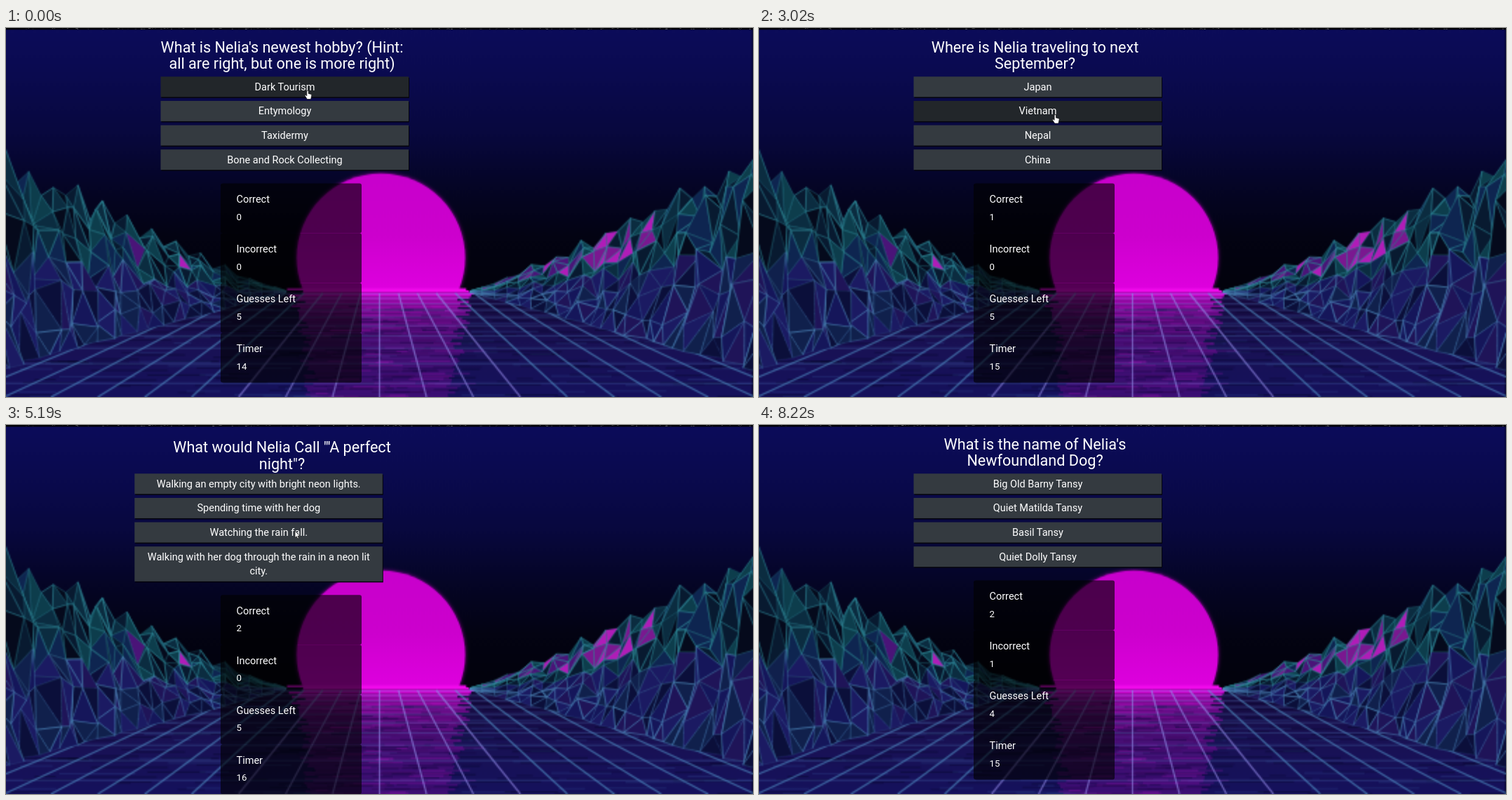
These frames come from a looping animation (1065 px wide and 526 px high, 8500 ms). An HTML page with a canvas:

```html
<!DOCTYPE html>
<html lang="en">
<head>
<meta charset="utf-8">
<title>Trivia quiz</title>
<style>
  html, body { margin: 0; width: 100%; height: 100%; overflow: hidden; background: #04041c; }
  canvas, svg { position: absolute; left: 0; top: 0; width: 1065px; height: 526px; display: block; }
  text { font-family: Roboto, "Liberation Sans", sans-serif; fill: #fff; }
  .title { font-size: 21.6px; text-anchor: middle; }
  .option { font-size: 14.5px; text-anchor: middle; }
  .label { font-size: 14.5px; }
  .value { font-size: 13.2px; }
</style>
</head>
<body>
<canvas id="scene" width="533" height="263"></canvas>
<svg id="ui" viewBox="0 0 1065 526"></svg>
<script>
const W = 1065, H = 526, HORIZON = 375, SUN_X = 535;
const LOOP = 8500, STEP = LOOP / 62;
const lerp = (a, b, k) => a + (b - a) * k;
const clamp = k => Math.min(1, Math.max(0, k));
const times = (n, make) => Array.from({ length: n }, (_, i) => make(i));

let seed = 77;
const rnd = () => (seed = (seed * 16807) % 2147483647) / 2147483647;
const spread = size => (rnd() - .5) * size;
const pick = list => list[Math.floor(rnd() * list.length)];

// ---------- Scenery, drawn once at half size for a soft look ----------
const ctx = document.getElementById('scene').getContext('2d');
ctx.scale(.5, .5);

// Evenly spaced colours from y0 down to y1
function vertical(y0, y1, ...colors) {
  const g = ctx.createLinearGradient(0, y0, 0, y1);
  colors.forEach((color, i) => g.addColorStop(i / (colors.length - 1), color));
  return g;
}

function box(x, y, w, h, fill) {
  ctx.fillStyle = fill;
  ctx.fillRect(x, y, w, h);
}

function line(x0, y0, x1, y1, color, width) {
  ctx.strokeStyle = color;
  ctx.lineWidth = width;
  ctx.beginPath();
  ctx.moveTo(x0, y0);
  ctx.lineTo(x1, y1);
  ctx.stroke();
}

function drawSky() {
  box(0, 0, W, H, vertical(0, HORIZON, '#0c0c5a', '#0a0a4e', '#08083e', '#050526', '#030312', '#02020c'));
}

function drawSun() {
  ctx.shadowColor = '#a000a8';
  ctx.shadowBlur = 3;
  ctx.beginPath();
  ctx.arc(SUN_X, 327.5, 120, 0, 7);
  ctx.fillStyle = vertical(206, 380, '#c800cc', '#cc00cd', '#e000e0');
  ctx.fill();
  ctx.shadowBlur = 0;
}

function drawGround() {
  box(0, HORIZON, W, H - HORIZON, vertical(HORIZON, H, '#160a3c', '#191154', '#15115c'));
  times(260, () => box(rnd() * W, lerp(HORIZON, H, rnd()), 20 + rnd() * 90, 2,
    pick(['rgba(4,6,36,.4)', 'rgba(4,6,36,.3)', 'rgba(50,80,150,.3)'])));
  // Ragged rows mirror the sun
  for (let y = HORIZON - 4; y < H; y += 3) {
    const v = (y - HORIZON) / (H - HORIZON);
    const left = 122 - 25 * v + spread(24), right = 122 - 25 * v + spread(24);
    const glow = Math.exp(-5 * Math.max(0, v));
    box(SUN_X - left, y, left + right, 3, `rgba(${140 + 100 * glow},10,${165 + 70 * glow},${.32 + .68 * glow})`);
  }
  times(110, () => box(415 + rnd() * 200, lerp(395, H, rnd()), 15 + rnd() * 60, 2,
    pick(['rgba(20,8,70,.45)', 'rgba(190,20,200,.25)'])));
  // Perspective grid
  for (let k = -13; k <= 13; k++) {
    line(533 + 27 * k, HORIZON + 3, 533 + 67 * k, H, Math.abs(k) < 4 ? 'rgba(150,140,235,.6)' : 'rgba(90,165,215,.55)', 2.4);
  }
  for (let depth = 1; depth > .4; depth -= .062) {
    const y = 278 + 101 / depth;
    line(0, y, W, y, 'rgba(90,140,205,.35)', 1.6);
  }
}

const teals = ['#0b2c40', '#0d3d4c', '#081a30', '#050a1c', '#0e2550'];
const indigos = ['#15165a', '#1b1a62', '#0b0f3a', '#1f1458', '#10204c'];
const magentas = ['#7a1890', '#b01cb8', '#4a1478'];

// Jagged range that rises from its foot at the horizon to the edge of the stage
function drawMountains(foot, edge, magentaOdds) {
  const cols = 24, rows = 6;
  const mesh = times(cols + 1, i => {
    const u = i / cols;
    const ridge = HORIZON - 190 * u ** 1.15 + (i % 2 ? -1 : 1) * rnd() * 34 * u;
    const base = HORIZON + 2 + 112 * u;
    return times(rows + 1, j => [
      lerp(foot, edge, u) + spread(34) * u * (j > 0),
      lerp(ridge, base, (j / rows) ** 1.2) + spread(44) * u * (j > 0 && j < rows)
    ]);
  });

  function facet(points, u, v) {
    const high = v < .5;
    ctx.beginPath();
    points.forEach(p => ctx.lineTo(...p));
    ctx.closePath();
    ctx.fillStyle = u < .62 && v < .3 && rnd() < magentaOdds ? pick(magentas) : pick(high ? teals : indigos);
    ctx.fill();
    ctx.strokeStyle = high ? `rgba(52,150,165,${.2 + rnd() * .5})` : `rgba(85,150,200,${.1 + rnd() * .5})`;
    ctx.lineWidth = 1 + rnd() * 1.2;
    ctx.stroke();
  }

  ctx.lineJoin = 'round';
  for (let i = 0; i < cols; i++) {
    for (let j = 0; j < rows; j++) {
      const a = mesh[i][j], b = mesh[i + 1][j], c = mesh[i][j + 1], d = mesh[i + 1][j + 1];
      facet([a, b, c], i / cols, j / rows);
      facet([b, d, c], i / cols, j / rows);
    }
  }
}

drawSky();
drawSun();
drawGround();
drawMountains(400, -20, .04);
drawMountains(662, W + 20, .5);

// ---------- Quiz ----------
const scenes = [
  { at: -2070, score: [0, 0, 5], title: ["What is Nelia's newest hobby? (Hint:", 'all are right, but one is more right)'],
    options: [['Dark Tourism'], ['Entymology'], ['Taxidermy'], ['Bone and Rock Collecting']] },
  { at: 1366, score: [1, 0, 5], title: ['Where is Nelia traveling to next', 'September?'],
    options: [['Japan'], ['Vietnam'], ['Nepal'], ['China']] },
  { at: 4550, score: [2, 0, 5], title: ['What would Nelia Call "\'A perfect', 'night"?'],
    options: [['Walking an empty city with bright neon lights.'], ['Spending time with her dog'], ['Watching the rain fall.'],
      ['Walking with her dog through the rain in a neon lit', 'city.']] },
  { at: 7110, score: [2, 1, 4], title: ["What is the name of Nelia's", 'Newfoundland Dog?'],
    options: [['Big Old Barny Tansy'], ['Quiet Matilda Tansy'], ['Basil Tansy'], ['Quiet Dolly Tansy']] }
];

const pointerStart = { x: 430, y: 89 };
const pointerMoves = [
  { from: 0, until: 680, x: 414.5, y: 152 },
  { from: 2340, until: 3800, x: 432, y: 88 },
  { from: 4120, until: 4520, x: 412, y: 151 },
  { from: 5770, until: 6580, x: 417, y: 121 },
  { from: 7130, until: 8200, x: 965, y: 550 }
];

function pointerAt(t) {
  return pointerMoves.reduce((pos, move) => {
    const k = clamp((t - move.from) / (move.until - move.from)), s = k * k * (3 - 2 * k);
    return { x: lerp(pos.x, move.x, s), y: lerp(pos.y, move.y, s) };
  }, pointerStart);
}

// The CSS "ease" curve, solved by bisection
function ease(x) {
  if (x <= 0 || x >= 1) return clamp(x);
  let lo = 0, hi = 1;
  for (let i = 0; i < 24; i++) {
    const s = (lo + hi) / 2;
    if (.75 * s * (1 - s) + s ** 3 < x) lo = s; else hi = s;
  }
  return .3 * lo * (1 - lo) ** 2 + 3 * lo * lo * (1 - lo) + lo ** 3;
}

const text = (cls, x, y, str) => `<text class="${cls}" x="${x}" y="${y}">${str}</text>`;
const rect = (x, y, w, h, fill, more = '') => `<rect x="${x}" y="${y}" width="${w}" height="${h}" fill="${fill}" ${more}/>`;

const strip = rect(0, 0, W, 2.5, '#020208')
  + times(150, () => rect(rnd() * W, Math.floor(rnd() * 2), 1 + rnd() * 2, 1, '#777', `opacity="${rnd() * .7}"`)).join('');

const hand = 'M-1.2 .8Q0-.8 1.2 .8V4.4L5 5.4Q6 5.8 5.8 7L4.6 12.5H-.6L-3.8 7.6Q-3.6 6-2.2 6.8L-1.2 7.8Z';
const arrow = 'M0 0V9.6L2.2 7.7L3.8 11L5.4 10.3L3.9 7.2H6.8Z';

function draw(t) {
  const scene = scenes.filter(s => s.at <= t).pop();
  const away = 1 - ease((t - scene.at - 45) / 1000);
  const pointer = pointerAt(t);
  let out = strip, buttons = '', hovering = false, y = 69.3;

  scene.title.forEach((str, i) => out += text('title', 393.5, 34.5 + 23.5 * i + 47 * away, str));

  for (const lines of scene.options) {
    const h = 29 + 20.7 * (lines.length - 1);
    const hover = !away && pointer.x > 220 && pointer.x < 574 && pointer.y >= y && pointer.y < y + h;
    hovering = hovering || hover;
    buttons += rect(221.5, y + 1.5, 353.5, h, '#04040c') + rect(220.5, y, 353.5, h, hover ? '#22262a' : '#343a40');
    lines.forEach((str, i) => buttons += text('option', 397.5, y + 19.5 + 20.7 * i, str));
    y += h + 5.63;
  }
  out += `<g transform="translate(${-354 * away} 0)">${buttons}</g>`;

  const timer = 16 - Math.floor((t - scene.at) / 1000);
  const values = [...scene.score, timer];
  ['Correct', 'Incorrect', 'Guesses Left', 'Timer'].forEach((label, i) => {
    const top = y + 13.7 + 71 * i;
    out += rect(306, top, 201, 71, '#000', 'rx="3" opacity=".62"')
      + text('label', 328.5, top + 27.5, label) + text('value', 328.5, top + 52, values[i]);
  });

  out += `<path transform="translate(${pointer.x} ${pointer.y})" d="${hovering ? hand : arrow}" fill="#fff" stroke="#111" stroke-width=".7"/>`;
  ui.innerHTML = out;
}

const ui = document.getElementById('ui');
let shown = -1;
function loop(now) {
  // The picture refreshes in even steps, slightly ahead of the clock
  const tick = Math.floor((now % LOOP + 30) / STEP) % 62;
  if (tick !== shown) draw((shown = tick) * STEP);
  requestAnimationFrame(loop);
}
loop(0);
</script>
</body>
</html>
```
